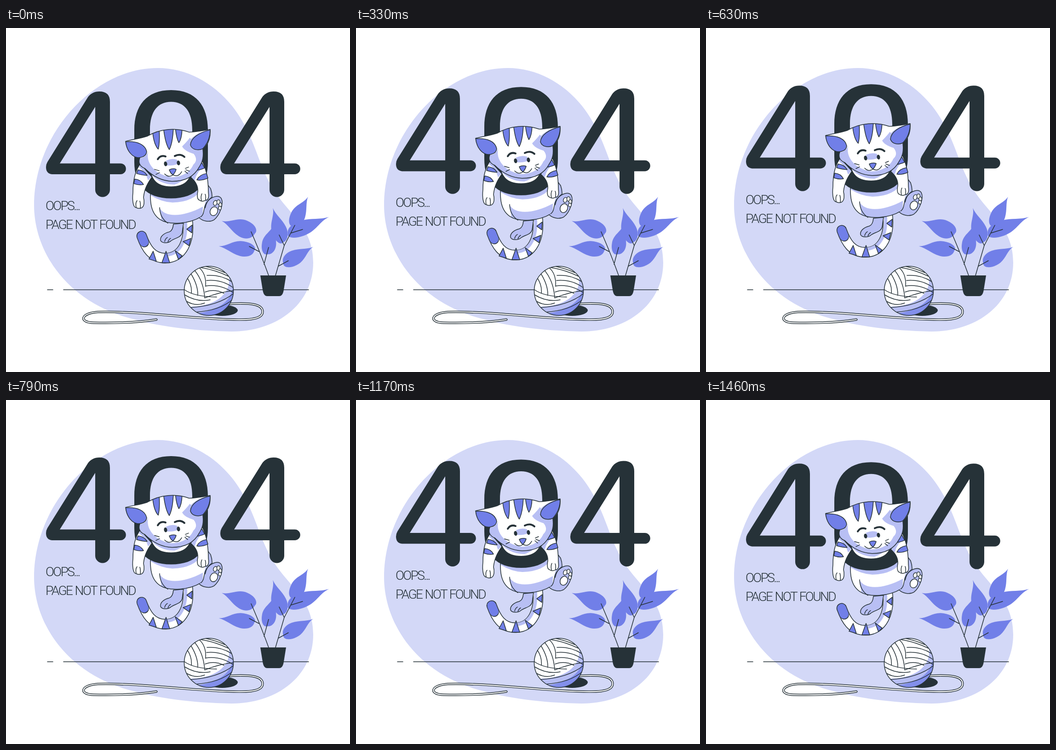
Recreate the animation shown at these times as an HTML page. Size 748 by 748 pixels, loop 1500 ms.

```html
<!DOCTYPE html>
<html lang="en">
<head>
<meta charset="utf-8">
<title>Page not found</title>
<style>
  html, body { margin: 0; width: 100%; height: 100%; overflow: hidden; background: #fff; }
  svg { display: block; width: 100vw; height: 100vh; }
  .pale { fill: #d3d8f7; }
  .shade { fill: #b8bff4; }
  .blue { fill: #717fe8; }
  .dark { fill: #263238; }
  .white { fill: #fff; }
  .line { stroke: #263238; stroke-width: 1.5; stroke-linecap: round; stroke-linejoin: round; }
  .open { fill: none; }
  .caption { font: 300 28px Roboto, "Open Sans", sans-serif; letter-spacing: -2.6px; word-spacing: 2px; }
</style>
</head>
<body>
<svg viewBox="0 0 748 748">
  <defs>
    <path id="four" fill-rule="evenodd" d="M178 151Q187 138.500 203 138.500Q226 138.500 226 161V295H249a11.800 11.800 0 0 1 0 23.600H226V352a16 16 0 0 1-32 0V318.600H100Q87 317 87 303Q87 297 90 292ZM194 172L117 295H194Z"/>
    <path id="leaf" d="M1 0C.76-.02 .62-.28 .32-.26C.06-.25-.06-.1 0 0C.02 .18 .2 .27 .4 .23C.64 .18 .78 .03 1 0Z"/>
    <path id="skull" d="M260 247C275 243 292 241 307 236C335 219 370 217 398 227C412 227 428 224 444 221C445 238 440 254 428 264C430 280 428 291 420 303C408 326 385 334 361 334C335 333 316 320 302 306C291 302 287 293 291 283C274 283 262 267 260 247Z"/>
    <path id="torso" d="M316 335C312 372 312 402 335 417C355 430 398 427 424 411C444 400 453 372 445 350L430 330Z"/>
    <path id="tail" d="M295 453C304 478 317 502 348 501C384 500 400 462 395 420"/>
    <path id="thread" d="M486 600C530 597 558 600 558 617C558 636 518 635 480 633.500C400 631 280 615 200 617.500C162 620 158 640 190 641C240 642 290 640 327 634"/>
    <circle id="wool" cx="441" cy="571.500" r="53.500"/>
    <clipPath id="skullClip"><use href="#skull"/></clipPath>
    <clipPath id="torsoClip"><use href="#torso"/></clipPath>
    <clipPath id="woolClip"><use href="#wool"/></clipPath>
  </defs>

  <path class="pale" d="M330 87C392 87 450 118 492 170C546 240 545 300 590 364C625 412 668 440 668 510C668 600 590 660 490 660C400 658 330 649 262 629C130 590 61 485 61 385C61 230 190 87 330 87Z"/>
  <path class="line open" d="M90 569.200H102M125 569.200H658"/>

  <!-- plant -->
  <g class="blue">
    <use href="#leaf" transform="translate(541 447) rotate(201) scale(77 -77)"/>
    <use href="#leaf" transform="translate(540 484) rotate(187) scale(78 -66)"/>
    <use href="#leaf" transform="translate(603 466) rotate(253) scale(78 66)"/>
    <use href="#leaf" transform="translate(568 492) rotate(282) scale(66 62)"/>
    <use href="#leaf" transform="translate(624 431) rotate(297) scale(72 64)"/>
    <use href="#leaf" transform="translate(613 447) rotate(338) scale(96 -66)"/>
    <use href="#leaf" transform="translate(603 512) rotate(331) scale(74 -66)"/>
  </g>
  <path class="line open" d="M571 538Q556 496 533 443M550 486L529 475M561 514L571 477M586 538L605 473L628 429M605 473L594 450M619 446L645 438M592 518L614 506"/>
  <path class="dark" d="M553 538H609L604 569Q602 583 594 583H568Q560 583 558 569Z"/>

  <!-- yarn -->
  <ellipse class="dark" cx="470" cy="614" rx="34" ry="12"/>
  <g class="open" stroke-linecap="round">
    <use href="#thread" stroke="#263238" stroke-width="5"/>
    <use href="#thread" stroke="#fff" stroke-width="2.200"/>
  </g>
  <use href="#wool" class="white"/>
  <g clip-path="url(#woolClip)">
    <path class="shade" d="M395 606Q440 606 464 588Q488 570 485 540L510 550V640H400Z"/>
    <path class="blue" d="M410 622Q450 616 472 600Q490 586 494 562L505 580V640H410Z" opacity=".75"/>
    <path class="line open" d="M411 528Q430 552 432 587M402 534Q418 560 417 582M394 543Q405 560 403 577M421 522Q436 536 434 562M432 518Q456 523 476 532M424 521Q455 526 484 540M437 538Q466 536 490 551M436 549Q468 546 493 564M434 561Q466 556 495 576M433 574Q454 566 474 577M388 569Q408 584 458 585M388 580Q416 597 444 591M392 594Q412 606 432 598M432 587Q464 574 495 571M400 608Q462 604 495 577M412 618Q466 614 493 590"/>
  </g>
  <use href="#wool" class="line open"/>

  <g class="float">
    <use href="#four" class="dark"/>
    <use href="#four" class="dark" x="379"/>
    <g class="dark caption">
      <text x="86" y="396.500">OOPS...</text>
      <text x="86" y="437.500">PAGE NOT FOUND</text>
    </g>

    <!-- tail and hind foot -->
    <g class="open" stroke-linecap="round">
      <use href="#tail" stroke="#263238" stroke-width="22.500"/>
      <use href="#tail" stroke="#fff" stroke-width="19.500"/>
      <path stroke="#b8bff4" stroke-width="7" d="M390 420C394 458 380 493 348 494"/>
      <use href="#tail" stroke="#263238" stroke-width="20" stroke-dasharray="15.500 400"/>
      <use href="#tail" stroke="#717fe8" stroke-width="19.500" stroke-dasharray="14 400"/>
    </g>
    <path class="blue line" d="M311 503L320 486L327 508ZM339 511L348 486L356 511ZM368 485L383 496L375 504ZM385 465L402 458L398 474ZM393 438L405 429L404 446Z"/>
    <path class="shade line" d="M364 427Q363 441 355 444C343 447 335 454 336 462C338 469 352 469 358 464C367 457 380 457 383 446L386 425Z"/>
    <path class="line open" d="M345 465Q346 459 351 456M352 466Q354 460 358 458"/>

    <!-- body -->
    <use href="#torso" class="white"/>
    <g clip-path="url(#torsoClip)">
      <path class="shade" d="M308 360Q335 379 362 380Q410 379 428 348V330H310ZM334 392C346 413 385 412 428 389V435H340ZM432 345Q440 365 430 390L450 395V345Z"/>
    </g>
    <use href="#torso" class="line open"/>
    <path class="line open" d="M334 391Q335 414 352 425"/>
    <path class="shade line" d="M424 411C433 404 428 391 437 379C446 368 462 362 468 371C474 382 465 408 452 418C442 424 426 420 420 413"/>
    <path class="line open" d="M433 392Q436 376 447 369"/>
    <g class="white line">
      <ellipse cx="452" cy="399" rx="8" ry="10" transform="rotate(25 452 399)"/>
      <ellipse cx="455" cy="381" rx="4" ry="5.500" transform="rotate(20 455 381)"/>
      <ellipse cx="462" cy="379" rx="3.500" ry="5"/>
      <ellipse cx="466" cy="385" rx="3.200" ry="4.500"/>
      <ellipse cx="465" cy="392" rx="3.200" ry="4"/>
    </g>

    <path class="white" d="M312 305V322Q326 346 359 346Q396 345 407 318V300Z"/>
    <path class="shade" d="M308 310Q330 341 366 341Q385 336 407 310Z"/>
    <path class="dark" fill-rule="evenodd" d="M279 222C279 170 305 135.500 359 135.500S439 170 439 222V292C439 340 415 371 359 371S279 340 279 292ZM313 222C313 182 330 161 359 161S405 182 405 222V292C405 330 390 345 359 345S313 330 313 292Z"/>

    <!-- arms -->
    <path class="white line" d="M292 296C280 312 276 333 276 358C274 378 277 391 283 391C287 394 293 393 296 391C301 387 301 377 299 369C301 350 308 338 317 325Z"/>
    <path class="shade" d="M292 298L316 324L309 332Q304 314 289 303Z"/>
    <path class="blue line" d="M287 309Q300 310 307 321Q297 321 284 317ZM280 329Q293 330 299 341Q289 343 278 339Z"/>
    <path class="white line" d="M427 290C438 313 440 340 440 358C442 371 438 376 434 375C430 378 424 378 421 375C416 374 415 366 417 356C418 344 412 334 402 325Z"/>
    <path class="shade" d="M425 292L403 325L410 332Q416 312 430 301Z"/>
    <path class="blue line" d="M426 294Q415 300 413 310Q424 309 432 305ZM436 317Q421 319 415 331Q426 333 439 327Z"/>
    <path class="line open" d="M283 391Q281 380 285 376M292 392Q293 383 291 377M425 376Q423 366 426 361M434 375Q435 366 433 362"/>

    <!-- head -->
    <use href="#skull" class="white"/>
    <g clip-path="url(#skullClip)">
      <path class="shade" d="M285 282Q300 287 309 270C303 298 330 322 361 325C386 324 402 311 407 298C414 292 416 284 408 274Q388 268 383 258Q396 245 402 236L436 215L460 280L420 345H300L280 300Z"/>
      <path class="white" d="M398 227L444 221Q415 228 402 242Q396 234 398 227Z"/>
      <path class="blue line" d="M260 248C285 246 303 254 306 270C304 283 287 284 278 281C266 272 261 260 260 248ZM444 222C420 228 402 239 401 255C405 267 420 267 428 263C440 250 444 236 444 222ZM319 229Q322 255 331 264Q335 250 333 220ZM342 215Q346 252 355 265Q363 250 364 215ZM368 215Q370 240 376 250Q383 240 383 215Z"/>
    </g>
    <use href="#skull" class="line open"/>
    <path class="shade" d="M348 289Q360 283 372 287L373 296Q362 301 350 299Z"/>
    <path class="line open" style="stroke-width:4" d="M330 286Q336 276 347 280M367 279Q379 273 388 281"/>
    <ellipse class="dark" cx="347" cy="296" rx="3.500" ry="5.200" transform="rotate(-10 347 296)"/>
    <ellipse class="dark" cx="375" cy="294" rx="3.500" ry="5.200" transform="rotate(-10 375 294)"/>
    <path class="blue line" d="M355 309Q363 305 370 308Q368 315 363 320Q358 317 355 309Z"/>
    <path class="line open" d="M345 318Q354 327 363 320Q375 326 382 313M323 308L333 311M326 319L334 315M390 306L397 303M391 309L399 312M389 312L395 317"/>
  </g>
</svg>
<script>
  const PERIOD = 1500, LEAD = 30, RISE = 15;
  const floating = document.querySelector('.float');

  function draw() {
    const phase = (performance.now() + LEAD) % PERIOD / PERIOD * 2;
    const y = -RISE * Math.min(phase, 2 - phase);
    floating.setAttribute('transform', `translate(0 ${y.toFixed(2)})`);
    requestAnimationFrame(draw);
  }
  draw();
</script>
</body>
</html>
```
